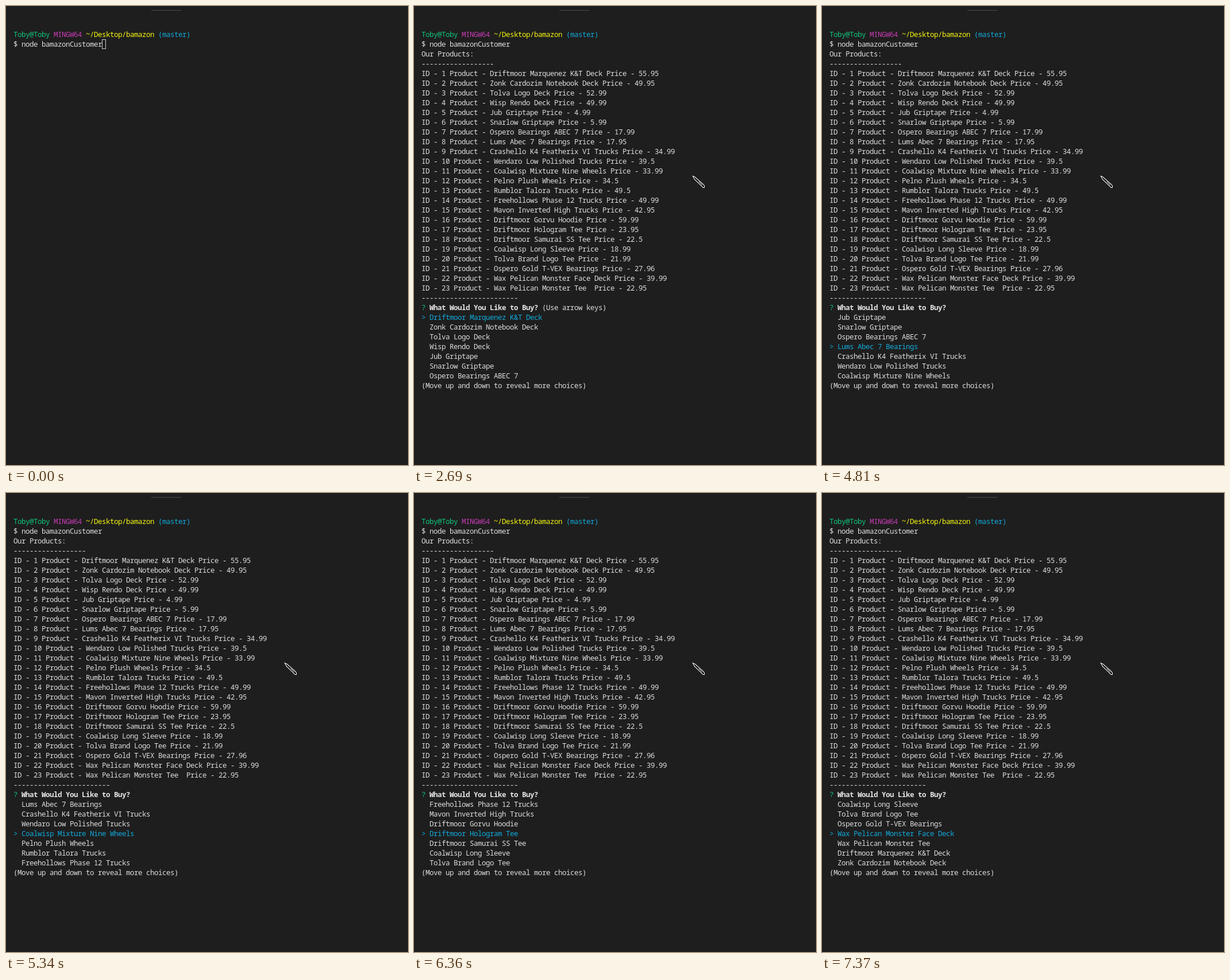
Write an HTML page that moves like this. It is 700 px wide and 800 px high and loops after 8 s.

```html
<!DOCTYPE html>
<html lang="en">
<head>
<meta charset="utf-8">
<title>Terminal shop</title>
<style>
  html, body { margin: 0; width: 100%; height: 100%; overflow: hidden; background: #1e1e1e; }
  pre, #cursor {
    position: absolute; margin: 0; color: #dedede;
    font: 500 12.5px/17px "Noto Sans Mono", "DejaVu Sans Mono", monospace;
    letter-spacing: calc(7px - 1ch); /* 7px grid */
    font-variant-ligatures: none; white-space: pre;
  }
  pre { left: 13px; top: 41px; }
  b { color: #e5e5e5; }
  .green { color: #10c87c; }
  .pink { color: #c83cb4; }
  .yellow { color: #f8f810; }
  .cyan { color: #11abdc; }
  #cursor { box-sizing: border-box; width: 7px; height: 17px; color: #1e1e1e; border: 1px solid #ccc; }
  #cursor.solid { background: #ccc; border: 0; }
  #bar { position: absolute; left: 253px; top: 7px; width: 52px; height: 1px; background: #4b4b4b; }
  #pen { position: absolute; left: 0; top: 0; overflow: visible; }
</style>
</head>
<body>
<div id="bar"></div>
<pre id="screen"></pre>
<div id="cursor"></div>
<svg id="pen" width="23" height="23">
  <path d="M.5 .5 L4 2 L19 15 L20.5 17.5 V20.5 H18.5 L3.5 6Z" fill="#000" stroke="#fff" stroke-width="1.1"/>
  <path d="M11 10 L17.5 16.5" stroke="#fff"/>
</svg>
<script>
const LOOP = 8000, PAGE = 7, MIDDLE = 3;

const products = `Driftmoor Marquenez K&amp;T Deck|55.95
Zonk Cardozim Notebook Deck|49.95
Tolva Logo Deck|52.99
Wisp Rendo Deck|49.99
Jub Griptape|4.99
Snarlow Griptape|5.99
Ospero Bearings ABEC 7|17.99
Lums Abec 7 Bearings|17.95
Crashello K4 Featherix VI Trucks|34.99
Wendaro Low Polished Trucks|39.5
Coalwisp Mixture Nine Wheels|33.99
Pelno Plush Wheels|34.5
Rumblor Talora Trucks|49.5
Freehollows Phase 12 Trucks|49.99
Mavon Inverted High Trucks|42.95
Driftmoor Gorvu Hoodie|59.99
Driftmoor Hologram Tee|23.95
Driftmoor Samurai SS Tee|22.5
Coalwisp Long Sleeve|18.99
Tolva Brand Logo Tee|21.99
Ospero Gold T-VEX Bearings|27.96
Wax Pelican Monster Face Deck|39.99
Wax Pelican Monster Tee |22.95`.split("\n").map(line => line.split("|"));

// Each press of the down key moves the selection by one.
const presses = [3700, 3940, 4090, 4170, 4410, 4640, 4810, 4960, 5110, 5340, 5430,
  5660, 5810, 6040, 6200, 6360, 6580, 6750, 6900, 7130, 7370];

// Pointer positions: time, x, y
const path = [
  [70, 572, 595], [130, 480, 345], [200, 406, 193], [350, 402, 180],
  [2230, 400, 179], [2300, 397, 184], [2380, 405, 200], [2460, 428, 230],
  [2540, 455, 262], [2610, 476, 286], [2690, 485, 296]
];

const el = id => document.getElementById(id);
const span = (color, text) => `<span class="${color}">${text}</span>`;

const prompt = [
  `${span("green", "Toby@Toby")} ${span("pink", "MINGW64")} ${span("yellow", "~/Desktop/bamazon")} ${span("cyan", "(master)")}`,
  "$ node bamazonCustomer"
];
const heading = ["Our Products:", "-".repeat(18)];
const stock = products.map(([name, price], i) => `ID - ${i + 1} Product - ${name} Price - ${price}`);

function menu(selected) {
  const first = Math.max(0, selected - MIDDLE);
  const rows = Array.from({ length: PAGE }, (_, k) => {
    const i = first + k, name = products[i % products.length][0];
    return i === selected ? span("cyan", "> " + name) : "  " + name;
  });
  const hint = selected ? "" : " (Use arrow keys)";
  return [
    "-".repeat(24),
    `${span("green", "?")} <b>What Would You Like to Buy?</b>${hint}`,
    ...rows,
    "(Move up and down to reveal more choices)"
  ];
}

function screenAt(t) {
  const lines = [...prompt];
  if (t >= 1760) lines.push(...heading);
  if (t >= 1830) lines.push(...stock, ...menu(presses.filter(p => p <= t).length));
  return lines.join("\n");
}

function drawCursor(t) {
  const cursor = el("cursor");
  const [col, row] = t < 1130 ? [22, 1] : t < 1760 ? [0, 2] : [0, 3];
  cursor.style.left = 13 + col * 7 + "px";
  cursor.style.top = 41 + row * 17 + "px";
  cursor.className = t >= 430 ? "solid" : "";
  cursor.textContent = row === 3 ? "-" : "";
  cursor.hidden = t >= 1830;
}

function drawPen(t) {
  const spot = path.filter(p => p[0] <= t).pop();
  el("pen").style.display = spot ? "block" : "none";
  if (spot) el("pen").style.transform = `translate(${spot[1]}px, ${spot[2]}px)`;
}

let shown = "";
function draw() {
  const t = performance.now() % LOOP;
  const text = screenAt(t);
  if (text !== shown) el("screen").innerHTML = shown = text;
  drawCursor(t);
  drawPen(t);
  requestAnimationFrame(draw);
}
draw();
</script>
</body>
</html>
```
